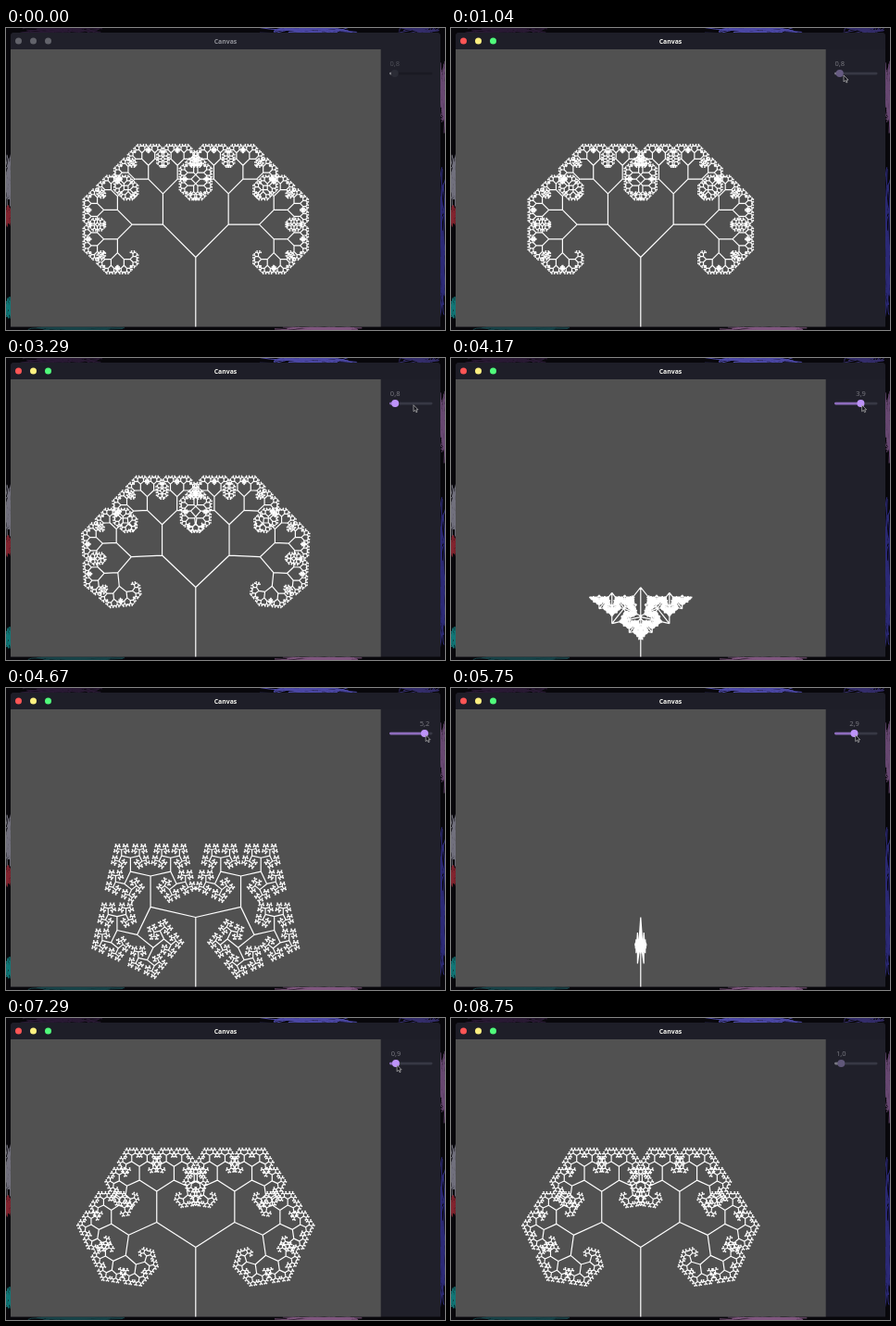
An HTML page that plays this animation: 474 px wide and 326 px high, repeating every 9 s.

```html
<!DOCTYPE html>
<html lang="en">
<head>
<meta charset="utf-8">
<title>Canvas</title>
<style>
  html, body { margin: 0; width: 100%; height: 100%; overflow: hidden; background: #08070b; }
  svg { display: block; width: 474px; height: 326px; }
  text { font-family: "Noto Sans", "Open Sans", sans-serif; text-anchor: middle; }
</style>
</head>
<body>
<svg viewBox="0 0 474 326">
  <g id="wallpaper" fill="none"></g>
  <path fill="#20202a" d="M5 322.5V9q0-4 4-4H465q4 0 4 4V322.5z"/>
  <path id="bar" d="M5 23V9q0-4 4-4H465q4 0 4 4V23z"/>
  <circle class="button" cx="13.5" cy="14" r="3.5"/>
  <circle class="button" cx="29.5" cy="14" r="3.5"/>
  <circle class="button" cx="45.5" cy="14" r="3.5"/>
  <text id="title" x="237" y="16.6" font-size="6.9" font-weight="700">Canvas</text>
  <path fill="#515151" d="M5 23H404.7V322.5H5z"/>
  <path id="tree" fill="none" stroke="#fff" stroke-width="1.2"/>

  <text id="label" y="41.2" font-size="7.5"></text>
  <rect id="track" x="414" y="47.8" width="46.5" height="2.6" rx="1.3"/>
  <rect id="fill" x="414" y="47.8" height="2.6" rx="1.3"/>
  <circle id="knob" cy="49.1" r="4"/>
  <path id="cursor" fill="#15151c" stroke="#bbb" stroke-width=".7"
    d="M0 0V7L1.7 5.6L2.9 8L4 7.5L2.9 5.1H5z"/>
</svg>
<script>
const $ = id => document.getElementById(id);
const LOOP = 9000, FPS = 24, LAG = 80;
const ROOT_X = 204.8, ROOT_Y = 322.5, TRUNK = 75, RATIO = 2 / 3, DEPTH = 12;
const TRACK_X = 414, TRACK_W = 46;

// Slider value in radians: [ms, value]
const valueKeys = [
  [1630, Math.PI / 4], [1920, 0], [2140, 0], [2330, .19], [3210, .81], [3290, .83],
  [3750, 3.5], [4290, 4], [4670, 5.2], [5130, 5.75], [5540, 3.3], [6630, 1.4],
  [7210, 1], [7960, .5], [8300, 1]
];

const ramp = (t, from, to) => Math.min(1, Math.max(0, (t - from) / (to - from)));
const mix = (a, b, k) => `color-mix(in srgb, ${b} ${k * 100}%, ${a})`;
const paint = (el, a, b, k) => { el.style.fill = mix(a, b, k); };

function valueAt(t) {
  let value = valueKeys[0][1];
  for (let i = 1; i < valueKeys.length; i++) {
    const [t0, v0] = valueKeys[i - 1], [t1, v1] = valueKeys[i];
    if (t >= t0) value = v0 + (v1 - v0) * ramp(t, t0, t1);
  }
  return value;
}

// Loose bundles of curved strokes: centre, spread, colour
function drawWallpaper() {
  let seed = 7;
  const random = () => (seed = seed * 16807 % 2147483647) / 2147483647;
  const around = (c, r) => (c + (random() * 2 - 1) * r).toFixed(1);
  const bundle = (x, y, rx, ry, color) => {
    let d = "";
    for (let i = 0; i < 28; i++) {
      const p = () => `${around(x, rx)} ${around(y, ry)}`;
      d += `M${p()}Q${p()} ${p()}`;
    }
    return `<path d="${d}" stroke="${color}"/>`;
  };
  $("wallpaper").innerHTML =
    bundle(60, 2, 50, 6, "#2a1a35") + bundle(325, 2, 60, 6, "#4d49a8") +
    bundle(445, 2, 25, 6, "#352e6c") + bundle(471, 75, 5, 40, "#684872") +
    bundle(471, 235, 5, 85, "#2c2a78") + bundle(2, 165, 4, 30, "#73727f") +
    bundle(2, 203, 4, 12, "#852530") + bundle(2, 302, 5, 12, "#117878") +
    bundle(75, 325, 55, 4, "#174348") + bundle(340, 325, 50, 4, "#80577f");
}

function treePath(angle) {
  let d = "";
  (function branch(x, y, dir, len, depth) {
    if (!depth) return;
    const x2 = x + Math.sin(dir) * len, y2 = y - Math.cos(dir) * len;
    d += `M${x.toFixed(2)} ${y.toFixed(2)}L${x2.toFixed(2)} ${y2.toFixed(2)}`;
    branch(x2, y2, dir + angle, len * RATIO, depth - 1);
    branch(x2, y2, dir - angle, len * RATIO, depth - 1);
  })(ROOT_X, ROOT_Y, 0, TRUNK, DEPTH);
  return d;
}

function pointer(t, knobX) {
  if (t < 1630) {
    const k = ramp(t, 910, 1040);
    return [278 + 146 * k, 2 + 49 * k];
  }
  if (t > 8500) return [363, 15];
  // The hand runs ahead while the knob catches up
  const ahead = t < 3750 ? 416 + 24 * ramp(t, 2020, 3290) : 0;
  return [Math.max(knobX + 1.2, ahead), 50.7];
}

function draw(t) {
  const value = valueAt(t), x = TRACK_X + TRACK_W * value / (2 * Math.PI);
  const focus = ramp(t, 340, 750);
  const hover = ramp(t, 1000, 1630) - ramp(t, 8380, 8740);

  $("tree").setAttribute("d", treePath(valueAt(t - LAG)));
  $("label").textContent = value.toFixed(1).replace(".", ",");
  $("label").setAttribute("x", x);
  $("knob").setAttribute("cx", x);
  $("fill").setAttribute("width", x - TRACK_X);

  paint($("bar"), "#20202a", "#1e1e28", focus);
  paint($("title"), "#92939a", "#f8f8f2", focus);
  paint($("label"), "#50515a", "#77777f", focus);
  paint($("track"), "#1a1a23", "#373844", focus);
  paint($("fill"), "#85868c", mix("#777780", "#8e6cbd", hover), focus);
  paint($("knob"), "#2b2c36", mix("#605779", "#bd93f9", hover), focus);
  document.querySelectorAll(".button").forEach((b, i) =>
    paint(b, "#62636b", ["#ff5555", "#fff080", "#50fa7b"][i], focus));

  $("cursor").style.display = t > 900 && t < 8740 ? "" : "none";
  $("cursor").setAttribute("transform", `translate(${pointer(t, x)})`);
}

let last = -1;
function tick() {
  const frame = Math.floor(performance.now() % LOOP * FPS / 1000 + .1);
  if (frame !== last) draw((last = frame) * 1000 / FPS);
  requestAnimationFrame(tick);
}
drawWallpaper();
tick();
</script>
</body>
</html>
```
